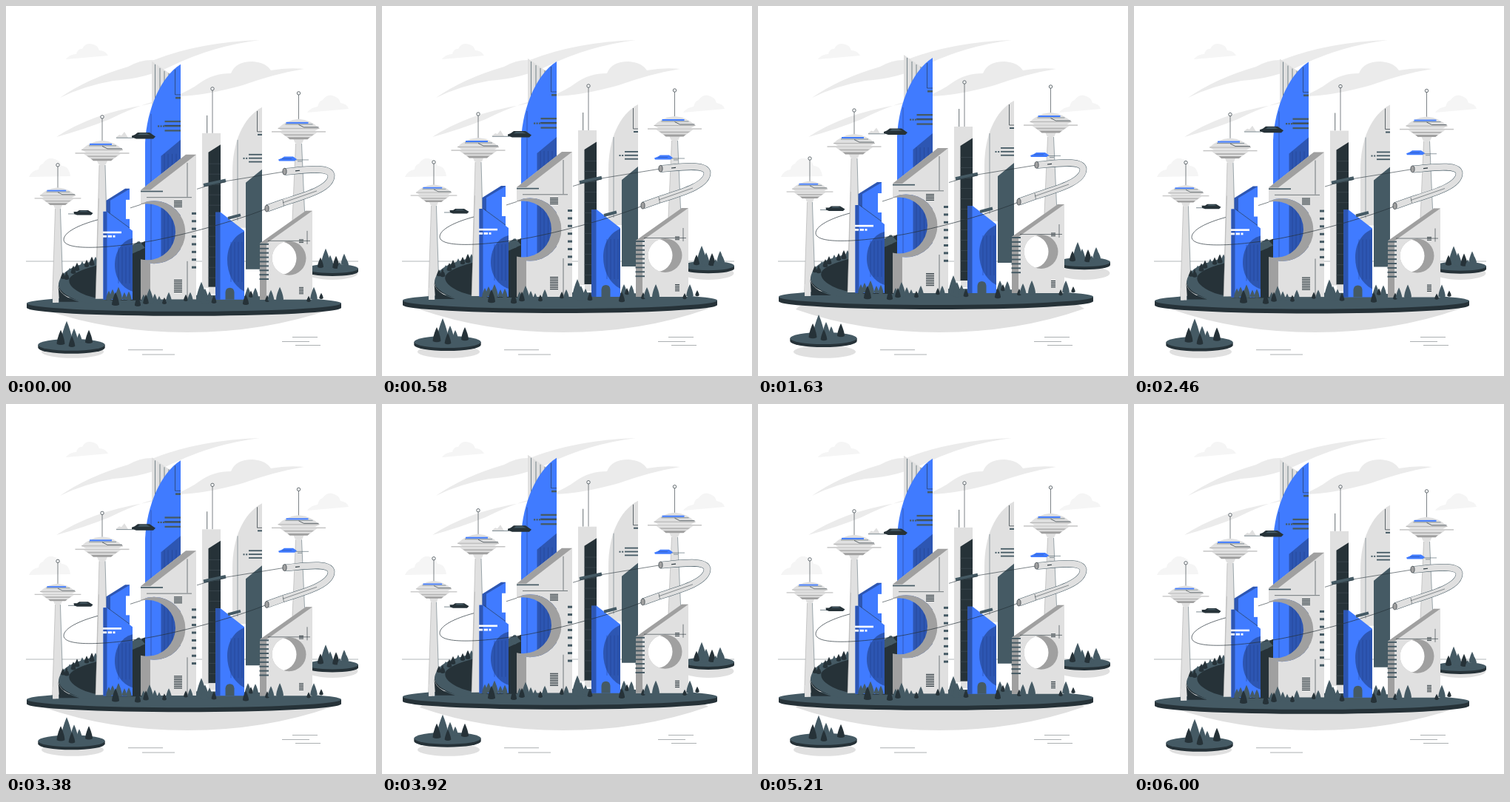
These frames come from a looping animation (500 px wide and 500 px high, 6040 ms). An HTML page:

```html
<!DOCTYPE html>
<html lang="en">
<head>
<meta charset="utf-8">
<title>Floating city</title>
<style>
html, body { margin: 0; width: 100%; height: 100%; overflow: hidden; background: #fff; }
svg { display: block; width: 100vw; height: 100vh; }
</style>
</head>
<body>
<svg id="stage" viewBox="0 0 500 500"></svg>
<script>
const BLUE = '#407bff', NAVY = '#2d56b2', DARK = '#263238', SLATE = '#455a64';
const LIGHT = '#e0e0e0', GREY = '#a0a0a0', PALE = '#f5f5f5', MIST = '#ebebeb';

const shape = (d, fill) => `<path d="${d}" fill="${fill}"/>`;
const line = (d, color = DARK, width = 0.6) =>
  `<path d="${d}" fill="none" stroke="${color}" stroke-width="${width}"/>`;
const rect = (x, y, w, h, fill) => `<rect x="${x}" y="${y}" width="${w}" height="${h}" fill="${fill}"/>`;
const oval = (x, y, rx, ry, fill) => `<ellipse cx="${x}" cy="${y}" rx="${rx}" ry="${ry}" fill="${fill}"/>`;
const repeat = (n, fn) => Array.from({ length: n }, (_, i) => fn(i)).join('');
const bars = (x, y, w, h, step, n, fill = SLATE) => repeat(n, i => rect(x, y + i * step, w, h, fill));
const uprights = (xs, y1, y2, color = DARK) => xs.map(x => line(`M${x},${y1}V${y2}`, color, 0.5)).join('');
const clip = (id, d) => `<clipPath id="${id}"><path d="${d}"/></clipPath>`;

function tree(x, y, h, dark) {
  const w = h * 0.22 + 1;
  return shape(`M${x},${y - h}C${x + w * 0.5},${y - h * 0.7} ${x + w},${y - h * 0.3} ${x + w},${y - 1}
    Q${x},${y + 1.5} ${x - w},${y - 1}C${x - w},${y - h * 0.3} ${x - w * 0.5},${y - h * 0.7} ${x},${y - h}Z`,
    dark ? DARK : SLATE);
}
const trees = list => list.map(t => tree(...t)).join('');

function disc(x, y, rx, ry, rim) {
  return shape(`M${x - rx},${y}v${rim}A${rx},${ry} 0 0 0 ${x + rx},${y + rim}v${-rim}Z`, DARK)
    + oval(x, y, rx, ry, SLATE);
}

const mast = (x, ball, foot) =>
  `<circle cx="${x}" cy="${ball}" r="2.2" fill="#fff" stroke="${DARK}" stroke-width=".7"/>` +
  line(`M${x},${ball + 2.2}V${foot}`);

// A saucer tower; y is the level of the wide plate.
function saucer(x, y, s, ball, foot, spread) {
  return shape(`M${x - 4 * s},${y + 16 * s}h${8 * s}L${x + spread},${foot}H${x - spread}Z`, LIGHT)
    + line(`M${x - 4 * s},${y + 16 * s}L${x - spread},${foot}`, GREY, 0.5)
    + line(`M${x + 4 * s},${y + 16 * s}L${x + spread},${foot}`, SLATE, 0.5)
    + mast(x, ball, y - 16 * s)
    + `<g transform="translate(${x} ${y}) scale(${s})">`
    + shape('M-8,8H8L5,15Q0,18 -5,15Z', LIGHT)
    + shape('M-16,7H16L12,10.5H-12Z', GREY)
    + shape('M-25,1H25L16,7.5H-16Z', LIGHT) + shape('M-21,3.5H21L18,5.5H-18Z', '#b5b5b5')
    + rect(-36.5, -0.7, 73, 1.5, '#c4c4c4')
    + shape('M-28,-4.5Q-17,-15.5 0,-17Q17,-15.5 28,-4.5L22,-1H-22Z', LIGHT)
    + line('M-28,-4.5H28', GREY, 0.7) + line('M-18,-10H19', SLATE, 0.6)
    + line('M-17,-12H13', BLUE, 2)
    + line('M0,-9.5L7,-6H27', DARK, 0.7)
    + '</g>';
}

function sky() {
  return shape('M81,72Q86,65 95,65Q97,57 103,58Q107,50 114,51Q124,52 126,60Q134,60 138,67Z', PALE)
    + shape('M407,144Q412,137 421,136Q423,128 428,127Q434,119 441,121Q450,123 452,131Q461,132 463,139Z', PALE)
    + shape('M31,231Q35,222 44,221Q45,214 50,213Q56,204 63,206Q73,208 75,216Q85,216 87,230Z', PALE)
    + shape('M73,124Q110,98 165,82Q182,72 200,73Q260,49 343,46Q280,54 226,80Q190,98 145,101Q105,108 73,124Z', MIST)
    + shape(`M68,177Q115,146 186,134Q235,124 262,104Q280,91 304,91Q310,75 333,75Q351,76 358,87Q380,83 403,85
      Q365,91 320,107Q270,121 232,122Q190,128 140,153Q105,167 68,177Z`, MIST);
}

function water() {
  return line('M27,345H476', '#7d868a', 0.6)
    + shape('M51,410Q54,406 60,404H433L441,409Q350,441 245,441Q140,441 51,410Z', LIGHT)
    + oval(90, 467.3, 42, 8.5, LIGHT) + oval(441, 361, 34.5, 9, LIGHT)
    + line('M387,447.5H421M373,453.5H410M391,458.5H425M165,464.7H212M184,471H228', '#a3a8aa', 0.9);
}

function road() {
  return shape('M71,378Q74,362 95,354Q150,338 188,318V398H98Q72,392 71,378Z', DARK)
    + shape('M73,369Q78,357 100,350Q150,336 180,318L188,327Q160,341 122,351Q92,359 86,368Q80,367 73,369Z', SLATE)
    + shape('M71,376Q72,369 76,366L87,366Q80,377 101,388Q114,395 140,397L110,402Q72,392 71,376Z', SLATE)
    + shape('M70.5,377Q71,392 99,400H72Z', DARK)
    + trees([[77, 369, 9, 1], [82, 370, 11, 1], [86, 364, 10], [91, 362, 11, 1], [96, 358, 11, 1],
      [103, 356, 11], [109, 353, 10, 1], [116, 351, 12, 1], [121, 347, 8], [178, 331, 13]]);
}

function blueSpire() {
  return shape('M197,75L222,92V220H197Z', LIGHT)
    + line('M201.5,79V125M208,84V115M214,88V107M220,91V100', SLATE, 0.7)
    + shape('M236,79V396H188V185C190,140 209,96 236,79Z', BLUE)
    + shape('M209.5,203L236,181V396H209.5Z', NAVY)
    + uprights([214, 219, 224.5, 230], 200, 345, '#203f85')
    + uprights([196], 146, 345, '#263b70')
    + line('M228.5,86V120H236', DARK, 0.6)
    + rect(229, 123, 7, 2.6, SLATE) + bars(214.5, 155, 21.5, 2.3, 6.2, 3)
    + repeat(3, i => rect(205 + i * 3.5, 161.5, 2.2, 2.2, SLATE))
    + line('M214,161.4H236', DARK, 0.6);
}

function ringHouse() {
  return clip('ring', 'M182,249L243,201H257V397H182Z')
    + `<g clip-path="url(#ring)">`
    + `<path fill-rule="evenodd" fill="${LIGHT}"
        d="M182,249L243,201H257V397H182ZM157.5,306a42.5,42.5 0 1 0 85,0a42.5,42.5 0 1 0 -85,0Z"/>`
    + `<path fill-rule="evenodd" fill="${GREY}"
        d="M157.5,306a42.5,42.5 0 1 0 85,0a42.5,42.5 0 1 0 -85,0ZM153,305.5a38,38 0 1 0 76,0a38,38 0 1 0 -76,0Z"/>`
    + shape('M182,343Q188,347 195,348V397H182Z', GREY)
    + '</g>'
    + shape('M182,249L243,201H257L195,249Z', GREY)
    + rect(182, 249.8, 30, 1.7, SLATE) + line('M190,258.8H251M245,212V258M245,345V396', DARK, 0.6)
    + bars(227, 263, 11, 1, 2, 5, DARK) + bars(227, 370, 11, 1.1, 2.3, 8, DARK)
    + bars(251, 279, 6, 3, 10.4, 8);
}

function blackTower() {
  return line('M271.7,148V172', DARK, 0.7) + mast(279, 112, 172)
    + rect(265, 172, 25, 209, LIGHT)
    + shape('M273.5,198L290,187.5V380H273.5Z', DARK)
    + bars(273.5, 213, 16.5, 0.5, 14, 12, '#46525a')
    + rect(274, 380, 9, 9, LIGHT);
}

function rightSpire() {
  return shape('M346,137V300H306V225C306,185 320,151 346,137Z', LIGHT)
    + line('M313,181V290', SLATE, 0.5)
    + line('M339.5,142V170H346', DARK, 0.7)
    + shape('M324,239L346,221V356H324Z', SLATE)
    + rect(340, 173, 6, 2, SLATE)
    + bars(328, 200, 18, 1.8, 4.9, 3)
    + repeat(2, i => rect(320.5 + i * 3.7, 205, 2, 2, SLATE));
}

function leftBlue() {
  return shape('M135.5,263L161,247H167V397H135.5Z', NAVY)
    + shape('M141,263L167,247.5V397H141Z', BLUE)
    + rect(162, 262, 5.3, 26, '#fff')
    + shape('M131.5,278H137L171,304V397H131.5Z', BLUE)
    + rect(131.5, 278, 5, 119, NAVY)
    + shape('M171,314C155,318 147,334 147,350C147,367 156,381 171,386Z', NAVY)
    + uprights([152, 157, 162, 167], 326, 375, '#203f85')
    + line('M137,278L167,300', DARK, 0.6)
    + rect(131, 304.8, 25, 2.6, '#fff')
    + rect(131, 310, 5, 2.8, '#fff') + rect(137.5, 310, 5.5, 2.8, '#fff') + rect(144.5, 310, 3, 2.8, '#fff');
}

function rightBlue() {
  return shape('M283,279H290L322,304V397H283Z', BLUE)
    + rect(283, 279, 6.5, 118, NAVY)
    + shape('M322,305C307,311 299,326 299,343C299,362 307,378 322,386Z', NAVY)
    + uprights([304, 309, 314, 319], 319, 373, '#203f85')
    + shape('M296.5,397V387Q297,381 302.5,381Q308,381 308.5,387V397Z', SLATE);
}

function eyeHouse() {
  return clip('eye', 'M359.5,341a23,23 0 1 0 46,0a23,23 0 1 0 -46,0Z')
    + shape('M343,321L405,277H414V397H343Z', LIGHT)
    + shape('M343,321L405,277H414L352,321Z', GREY)
    + rect(343, 321, 9, 76, GREY)
    + `<circle cx="382.5" cy="341" r="23" fill="${GREY}"/>`
    + `<circle cx="370" cy="341" r="22.5" fill="#fff" clip-path="url(#eye)"/>`
    + bars(342.5, 321, 12.5, 2, 5.9, 9)
    + line('M354,317.5H411M407,304V322', DARK, 0.6)
    + bars(396, 315.5, 6, 0.9, 1.9, 3, DARK) + bars(396, 380, 6, 1, 2.1, 5, DARK);
}

function rail() {
  const tube = 'M353,273.5L374,266C402,257 440,247 439.5,229C437,216 402,222 377,224';
  return line('M124,289C98,296 78,306 78,316C79,333 150,326 200,317C260,305 320,287 352,274', DARK, 0.7)
    + line('M168,273L182,268.5M258,247.5L268,244.5M296,237L376,224', DARK, 0.6)
    + line('M267,242.5L297,236', SLATE, 4.6) + line('M268,244L296,238', DARK, 0.6)
    + line('M300,287L317,282.5', SLATE, 4)
    + line(tube, SLATE, 9.6) + line(tube, LIGHT, 8.6)
    + line('M374,262L375.5,270M374,266L420,250', DARK, 0.5)
    + line('M391,223L397,222.4', DARK, 1.2)
    + [[352.5, 273.7], [376.5, 223.8]].map(([x, y]) =>
      `<ellipse cx="${x}" cy="${y}" rx="2.6" ry="4.4" fill="${GREY}" stroke="${DARK}" stroke-width=".7"/>`).join('');
}

function city() {
  return disc(441, 355, 35, 6.2, 4)
    + trees([[432, 356, 28], [425, 354, 14, 1], [438, 354, 17], [457, 350, 15], [446, 355, 17, 1], [451, 356, 10], [460, 351, 9]])
    + saucer(395.5, 170, 1, 118, 300, 9)
    + saucer(130, 199, 1, 150, 398, 9)
    + saucer(70, 260, 0.86, 215, 401, 7.5)
    + disc(240.5, 402, 212.5, 11, 6)
    + shape('M67,395V401H63L63.5,392Z', LIGHT) + rect(63.2, 385, 8, 16, LIGHT)
    + road()
    + shape('M125,260H134L135,396H121Z', LIGHT) + line('M125.5,260L121,396', GREY, 0.5)
    + blueSpire() + blackTower() + rightSpire()
    + leftBlue() + ringHouse() + rightBlue() + eyeHouse() + rail()
    + trees([[139, 398, 13], [144, 396, 13], [152, 398, 18], [160, 397, 10], [166, 398, 12], [148, 405, 18, 1],
      [186, 399, 9], [194, 402, 20], [178, 406, 14, 1], [189, 403, 13, 1], [201, 399, 10], [207, 402, 10],
      [214, 403, 9, 1], [220, 400, 13], [243, 399, 9, 1], [249, 399, 12], [264, 400, 27], [269, 402, 20],
      [275, 399, 13], [281, 402, 11, 1], [327, 395, 15], [324, 404, 14, 1], [331, 394, 9, 1], [337, 394, 13],
      [353, 400, 9, 1], [358, 399, 15], [370, 398, 18], [409, 400, 8, 1], [416, 397, 17], [426, 396, 8, 1]])
    + disc(88.5, 458, 45.2, 8, 4)
    + trees([[82, 455, 29], [92, 455, 19], [99, 455, 13], [74, 458, 20, 1], [112, 456, 18, 1], [89, 461, 15, 1]]);
}

function ships() {
  return shape('M148,178L153,174L156,175L160,170L165,178Z', LIGHT)
    + line('M149,178.3H172M84,281H94', SLATE, 0.7)
    + shape('M170,175.5L174,174L178,171H194L202,176.5L199,179.5H176L170,177.5Z', DARK)
    + shape('M178,174.3L181,172H190L195,174.3Z', SLATE)
    + shape('M91.5,278L96,278L99,276H111L117.5,280L115,282.5H96L92,281Z', DARK)
    + shape('M99,278.3L101,276.8H108L112,278.3Z', SLATE)
    + line('M390,208H409M394,210H400', SLATE, 0.6)
    + shape('M368,207.5L373,205.5L376,203.5H388L393,207L390,209.5H369Z', BLUE)
    + line('M373,206.5H386', NAVY, 0.7);
}

const stage = document.getElementById('stage');
stage.innerHTML = sky() + water() + `<g id="city">${city()}</g><g id="ships">${ships()}</g>`;
const cityGroup = document.getElementById('city');
const shipGroup = document.getElementById('ships');

const LOOP = 6040, LIFT = 10;
const rise = (t, period) => -LIFT * (1 - Math.abs(1 - 2 * (t % period) / period));

function draw(now) {
  const t = now % LOOP + 20;
  cityGroup.setAttribute('transform', `translate(0 ${rise(t, 3000)})`);
  shipGroup.setAttribute('transform', `translate(0 ${rise(t, 6000)})`);
}

const start = performance.now();
function tick() {
  draw(performance.now() - start);
  requestAnimationFrame(tick);
}
draw(0);
requestAnimationFrame(tick);
</script>
</body>
</html>
```
